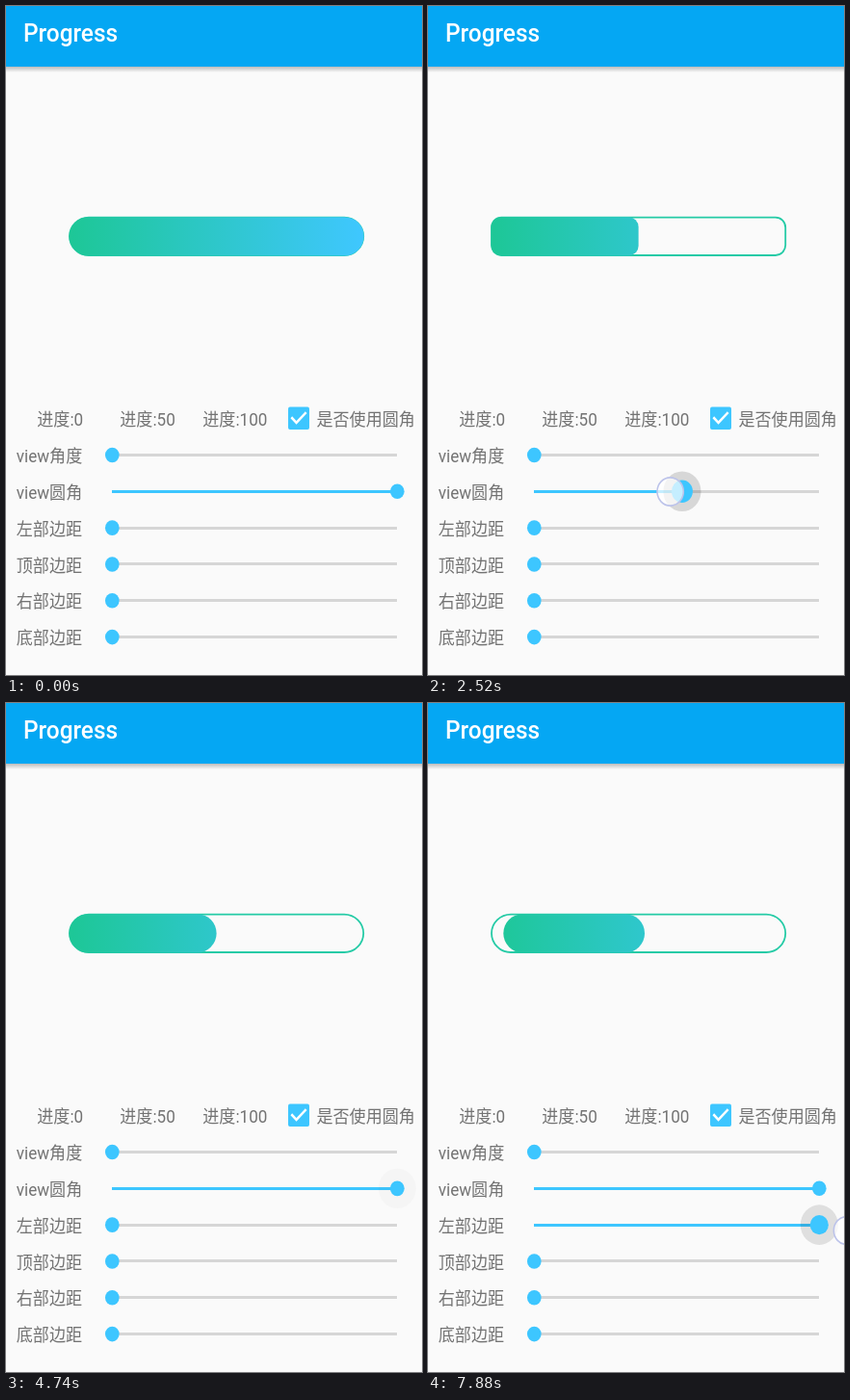
These frames come from a looping animation (432x695 px, 8000 ms). An HTML page:

```html
<!DOCTYPE html>
<html lang="zh-CN">
<head>
<meta charset="utf-8">
<title>Progress</title>
<style>
  html, body { margin: 0; height: 100%; overflow: hidden; background: #fafafa; }
  svg { display: block; font: 14px Roboto, "Noto Sans CJK SC", "Noto Sans CJK", sans-serif; fill: #737373; }
  .accent { fill: #3dc6ff; }
  .title { font-size: 20px; font-weight: 500; fill: #fff; }
</style>
</head>
<body>
<svg id="stage" width="432" height="695" viewBox="0 0 432 695">
  <defs>
    <linearGradient id="fillColor" gradientUnits="userSpaceOnUse" x1="65" x2="372" y1="0" y2="0">
      <stop stop-color="#1dc796"/><stop offset="1" stop-color="#3fc7ff"/>
    </linearGradient>
    <linearGradient id="shadow" x2="0" y2="1">
      <stop stop-opacity=".25"/><stop offset="1" stop-opacity="0"/>
    </linearGradient>
  </defs>
  <rect y="63" width="432" height="6" fill="url(#shadow)"/>
  <rect width="432" height="63" fill="#05a7f3"/>
  <rect id="outline" x="66" y="219.6" width="305.2" height="39.4" fill="none" stroke="#25cba6" stroke-width="1.8"/>
  <rect id="fill" y="219.2" height="40.2" fill="url(#fillColor)"/>
</svg>
<script>
const LOOP = 8000, TRACK_START = 110, TRACK_END = 406;
const stage = document.getElementById('stage');
const fill = document.getElementById('fill');
const outline = document.getElementById('outline');

function add(parent, tag, attrs, text = '') {
  const el = document.createElementNS('http://www.w3.org/2000/svg', tag);
  set(el, attrs);
  el.textContent = text;
  return parent.appendChild(el);
}
function set(el, attrs) {
  for (const name in attrs) el.setAttribute(name, attrs[name]);
}

// Screen density differs slightly between the two axes.
const at = (x, y) => `translate(${x} ${y}) scale(1.22 1.3)`;
const label = (text, x, y, cls = '') => add(stage, 'text', { transform: at(x, y), class: cls }, text);

// Linear interpolation through time, value, time, value, ...
function tween(t, ...keys) {
  if (t <= keys[0]) return keys[1];
  for (let i = 2; i < keys.length; i += 2) {
    if (t < keys[i]) {
      const k = (t - keys[i - 2]) / (keys[i] - keys[i - 2]);
      return keys[i - 1] + k * (keys[i + 1] - keys[i - 1]);
    }
  }
  return keys.at(-1);
}

label('Progress', 18, 37, 'title');
label('进度:0', 32.3, 435.8);
label('进度:50', 118.3, 435.8);
label('进度:100', 204.3, 435.8);
label('是否使用圆角', 322.5, 435.8);

const checkbox = add(stage, 'g', { transform: at(304, 428.2) });
const checkRipple = add(checkbox, 'circle', { r: 20, class: 'accent' });
const box = add(checkbox, 'g', {});
const square = add(box, 'rect', { x: -9, y: -9, width: 18, height: 18, rx: 1.5 });
const hole = add(box, 'rect', { x: -7, y: -7, width: 14, height: 14, fill: '#fafafa' });
const tick = add(box, 'path', { fill: 'none', stroke: '#fff', 'stroke-width': 2 });

const sliders = ['view角度', 'view圆角', '左部边距', '顶部边距', '右部边距', '底部边距'].map((name, i) => {
  const y = 466.5 + i * 37.82;
  const track = { x: TRACK_START, y: Math.floor(y) - 1, height: 3 };
  label(name, 10.8, y + 7.6);
  add(stage, 'rect', { ...track, width: TRACK_END - TRACK_START, fill: '#d6d6d6' });
  const bar = add(stage, 'rect', { ...track, class: 'accent' });
  const knob = add(stage, 'g', {});
  const ripple = add(knob, 'circle', { r: 16, fill: '#000' });
  const thumb = add(knob, 'circle', { class: 'accent' });
  return (x, press) => {
    set(bar, { width: x - TRACK_START });
    set(knob, { transform: at(x + 0.3, y) });
    set(ripple, { opacity: press * 0.14 });
    set(thumb, { r: 6 + 3 * press * press });
  };
});
sliders.forEach(update => update(TRACK_START, 0));

const finger = add(stage, 'circle', {
  r: 11.2, fill: '#fff', 'fill-opacity': 0.7, stroke: '#bcc3ea', 'stroke-width': 1.3
});
const touches = [[120, 560], [2000, 3100], [3650, 4560], [6540, LOOP]];

function drawBar(progress, radius, padding) {
  set(fill, { x: 65.5 + padding, width: progress * (306.2 - padding), rx: radius });
  set(outline, { rx: radius });
}

function drawCheckbox(t) {
  const checked = tween(t, 5150, 1, 5600, 0, 5790, 0, 6260, 1);
  const open = Math.max(0, 1 - checked * 2);
  const grow = Math.max(0, checked * 2 - 1);
  set(box, { transform: `scale(${1 - 0.1 * Math.sin(Math.PI * checked)})` });
  set(square, { fill: checked > 0 ? '#3dc6ff' : '#737373' });
  set(hole, { transform: `scale(${open})` });
  set(tick, {
    d: `M${-2 - 4.3 * grow} ${3.6 - 4.3 * grow}L-2 3.6L${-2 + 8.3 * grow} ${3.6 - 8.3 * grow}`,
    opacity: grow > 0 ? 1 : 0
  });
  set(checkRipple, {
    opacity: t < 6540 ? tween(t, 5050, 0, 5150, 0.12, 5450, 0.12, 5600, 0, 5700, 0, 5800, 0.1) : 0
  });
}

function draw(t) {
  const roundX = tween(t, 2100, 406, 2220, 372, 2520, 264, 2950, 110, 3700, 110, 3860, 170, 4490, 406);
  const roundPress = t < 5050
    ? tween(t, 2050, 0, 2350, 1, 3100, 1, 3290, 0, 3780, 0, 3860, 0.15, 4020, 1, 4540, 1, 4730, 0.15)
    : 0;
  const leftX = tween(t, 6600, 110, 7500, 395, 7640, 406);
  const leftPress = tween(t, 6540, 0, 6800, 1, 7640, 1, 7880, 0.78);
  const ratio = x => (x - TRACK_START) / (TRACK_END - TRACK_START);
  const rounded = t < 5150 || t >= 5790;

  drawBar(tween(t, 590, 1, 1050, 0.5), rounded ? 20 * ratio(roundX) : 0, 12.8 * ratio(leftX));
  drawCheckbox(t);
  sliders[1](roundX, roundPress);
  sliders[2](leftX, leftPress);

  const fingerX = t < 2000 ? 148
    : t < 3300 ? roundX - 12
    : t < 5000 ? roundX + 18
    : tween(t, 6600, 117, 7500, 402, 7880, 435);
  const fingerY = t < 2000 ? 428 : t < 3300 ? 504.5 : t < 5000 ? 512 : 548;
  set(finger, {
    transform: at(fingerX, fingerY),
    opacity: touches.some(([from, to]) => t >= from && t < to) ? 1 : 0
  });
}

const start = performance.now();
function tickClock() {
  draw((performance.now() - start) % LOOP);
  requestAnimationFrame(tickClock);
}
tickClock();
</script>
</body>
</html>
```
